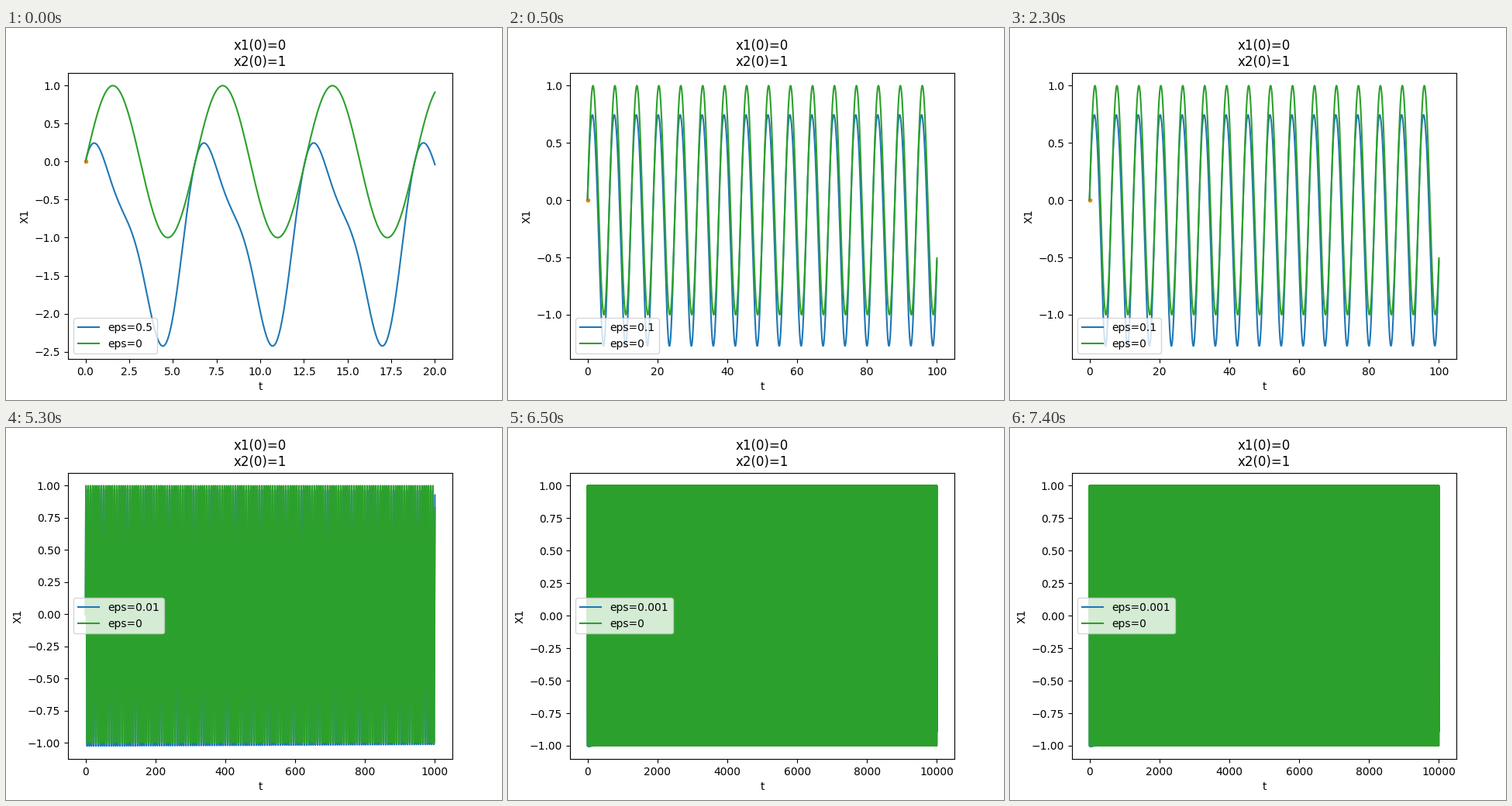
Recreate the animation shown at these times as a matplotlib script. Size 640x480 px, loop 8000 ms.

```python
import numpy as np
import matplotlib.pyplot as plt
from matplotlib.animation import FuncAnimation

STEP = 0.04        # sampling step in t
DRIFT = 3.0e-4     # phase lead of the integrated solution per unit t
DAMPING = 1.15e-5  # amplitude loss per unit t
INTERVAL = 500     # ms

# (eps, number of intervals shown, legend position)
SCENES = [
    (0.5, 1, "lower left"),
    (0.1, 6, "lower left"),
    (0.01, 6, "center left"),
    (0.001, 3, "center left"),
]
ORDER = [scene for scene in SCENES for _ in range(scene[1])]


def perturbed(t, eps):
    """Solution of x'' + x = -4 eps cos(t)^2 with x(0)=0, x'(0)=1."""
    phase = (1 + DRIFT) * t
    free = np.exp(-DAMPING * t) * (np.sin(phase) + 4 / 3 * eps * np.cos(phase))
    forced = eps * (-2 + 2 / 3 * np.cos(2 * t))
    return free + forced


fig, ax = plt.subplots(figsize=(6.4, 4.8), dpi=100)


def draw(i):
    eps, _, loc = ORDER[i]
    end = 10 / eps
    t = np.linspace(0, end, int(round(end / STEP)) + 1)
    ax.clear()
    ax.plot(t, perturbed(t, eps), color="C0", label=f"eps={eps}")
    ax.plot(0, 0, ".", color="C1")
    ax.plot(t, np.sin(t), color="C2", label="eps=0")
    ax.set_title("x1(0)=0\nx2(0)=1")
    ax.set_xlabel("t")
    ax.set_ylabel("X1")
    ax.legend(loc=loc)


anim = FuncAnimation(fig, draw, frames=len(ORDER), init_func=lambda: None,
                     interval=INTERVAL, repeat=True, repeat_delay=0)
plt.show()
```
